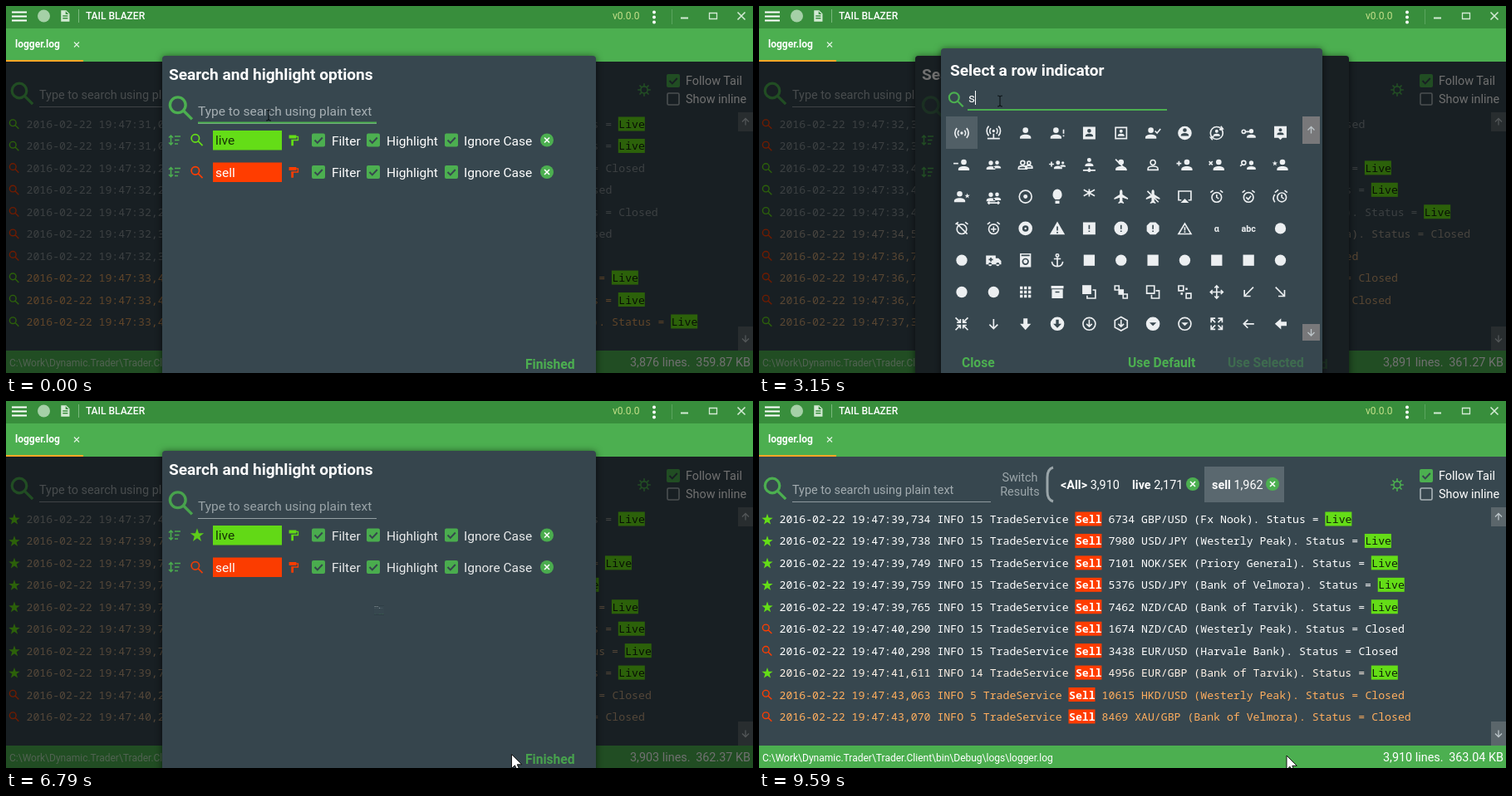
Animation of 899 by 442 pixels, one loop 9.66 s. Source, as an HTML page:

```html
<!DOCTYPE html>
<html lang="en">
<head>
<meta charset="utf-8">
<title>Log viewer</title>
<style>
html,body{margin:0;width:100%;height:100%;overflow:hidden;background:#37474f}
svg{display:block;width:899px;height:442px;font-family:Roboto,sans-serif}
text{white-space:pre}
.mono{font:13.2px "Noto Sans Mono","DejaVu Sans Mono",monospace}
.panel{filter:drop-shadow(0 1px 4px rgba(0,0,0,.6))}
</style>
</head>
<body>
<svg id="stage" viewBox="0 0 899 442"></svg>
<script>
const LOOP = 9660, GREEN = '#4caf50', LIVE = '#64dd17', SELL = '#ff3d00', SLATE = '#37474f', PALE = '#eceff1';
const $ = id => document.getElementById(id);
const clamp = v => Math.max(0, Math.min(1, v));
const ramp = (t, a, b) => clamp((t - a) / (b - a));
const ease = p => p * p * (3 - 2 * p);

// --- drawing helpers, icons live in a 24 unit box ---
const dot = (x, y, r) => `M${x - r} ${y}a${r} ${r} 0 1 0 ${2 * r} 0a${r} ${r} 0 1 0 ${-2 * r} 0z`;
const man = (x = 12, y = 4, s = 1) => {
  const a = 4 * s, b = 8 * s;
  return `M${x} ${y}a${a} ${a} 0 1 1 0 ${b} ${a} ${a} 0 0 1 0 ${-b}m0 ${10 * s}c${4.4 * s} 0 ${b} ${1.8 * s} ${b} ${a}v${2 * s}h${-2 * b}v${-2 * s}c0 ${-2.2 * s} ${3.6 * s} ${-a} ${b} ${-a}z`;
};
const star = (x, y, r) => 'M' + [...Array(10).keys()].map(i => {
  const q = i % 2 ? r * .4 : r, w = i * Math.PI / 5;
  return (x + q * Math.sin(w)).toFixed(2) + ' ' + (y - q * Math.cos(w)).toFixed(2);
}).join('L') + 'z';
const box = (x, y, w, h = w) => `M${x} ${y}h${w}v${h}h${-w}z`;

// parts split by "|": "." strokes, "T" writes, the rest fills
const icon = (spec, x, y, s = .83, color = PALE) =>
  `<g transform="translate(${x - 12 * s} ${y - 12 * s}) scale(${s})">` + spec.split('|').map(p =>
    p[0] === '.' ? `<path d="${p.slice(1)}" fill="none" stroke="${color}" stroke-width="2"/>` :
    p[0] === 'T' ? `<text x="12" y="17" text-anchor="middle" font-size="13" font-weight="700" fill="${color}">${p.slice(1)}</text>` :
    `<path d="${p}" fill="${color}" fill-rule="evenodd"/>`).join('') + '</g>';
const txt = (x, y, s, size, fill = '#fff', more = '') => `<text x="${x}" y="${y}" font-size="${size}" fill="${fill}" ${more}>${s}</text>`;
const rect = (x, y, w, h, fill, more = '') => `<rect x="${x}" y="${y}" width="${w}" height="${h}" fill="${fill}" ${more}/>`;
const line = (d, color, w = 1, more = '') => `<path d="${d}" fill="none" stroke="${color}" stroke-width="${w}" ${more}/>`;
const BOLD = 'font-weight="600"';

const MAG = '.' + dot(9.5, 9.5, 5.5) + 'M13.6 13.6l6 6';
const STAR = star(12, 12.5, 10);
const check = (x, y) => rect(x, y, 16, 16, GREEN, 'rx="2"') + line(`M${x + 3.5} ${y + 8}l3.3 3.4 6-6.4`, SLATE, 2);
const cross = (x, y) => `<circle cx="${x}" cy="${y}" r="8" fill="${GREEN}"/>` + line(`M${x - 3} ${y - 3}l6 6m0-6l-6 6`, '#fff', 1.6);
const arrowBox = (x, y, w, h, up, fill) => {
  const cx = x + w / 2, cy = y + h / 2, k = up ? -1 : 1;
  return rect(x, y, w, h, fill) + line(`M${cx} ${cy - 4 * k}v${8 * k}m-4 ${-4 * k}l4 ${4 * k} 4 ${-4 * k}`, '#bcc5c9', 1.3);
};

// --- icon picker ---
const waves = y => `.M8 ${y - 4}a6 6 0 0 0 0 8M16 ${y - 4}a6 6 0 0 1 0 8M5 ${y - 7}a10 10 0 0 0 0 14M19 ${y - 7}a10 10 0 0 1 0 14|` + dot(12, y, 2);
const pair = man(8, 6, .8) + man(17, 6, .7);
const slash = '|.M4 4l16 16';
const bell = '.' + dot(12, 13, 7) + 'M3 6l4-3M21 6l-4-3';
const ring = '.' + dot(12, 12, 9);
const disc = dot(12, 12, 10);
const mark = 'M11 7h2v6h-2zM11 15h2v2h-2z';
const plane = 'M12 2q2 0 2 4v3l8 5v2l-8-2.500v5l2 2v1.500l-4-1-4 1v-1.500l2-2v-5l-8 2.500v-2l8-5v-3q0-4 2-4z';
const ROUND = dot(12, 12, 8), SQUARE = box(4, 4, 16);
const down = 'M12 5v14M6 13l6 6 6-6', drop = 'M7 10h10l-5 5z';
const person = [man(9) , man(15)];
const withStar = [star(4, 10, 4) + man(15), man(9) + star(20, 11, 4)];
const ICONS = [
  waves(12), waves(9) + '|.M12 13v7M3 20h18', man(), man(10) + 'M20 7h2v6h-2zM20 15h2v2h-2z', box(3, 3, 18) + man(12, 6, .7),
  '.' + box(4, 4, 16) + '|' + man(12, 7, .6), person[0] + '|.M15 9l3 3 5-6', disc + man(12, 5, .7), ring + 'M18 2l3 4-5 1M6 22l-3-4 5-1|' + man(12, 7, .6),
  man(16, 6, .8) + '|.' + dot(5, 10, 2.5) + 'M7 10h6', 'M3 2h18v17h-6l-3 3-3-3h-6z' + man(12, 5, .6),
  person[1] + '|.M0 10h7', pair, '.' + man(8, 6, .75) + man(17, 7, .6), man(13, 6, .75) + man(20, 7, .5) + '|.M0 11h7M3.500 7.500v7', man(12, 2, .75) + '|.M12 16v4M3 20h18|' + dot(12, 20, 2.5),
  man() + slash, '.' + man(12, 5, .9), person[1] + '|.M0 10h7M3.500 6.500v7', person[1] + '|.M1 7l5 5m0-5l-5 5', man(16, 6, .8) + '|.' + dot(5, 9, 3) + 'M3 11l-3 3', withStar[0],
  withStar[1], pair + '|.M4 21h16M6 19l-2 2 2 2M18 19l2 2-2 2', ring + '|' + dot(12, 12, 3), 'M12 1a7 8 0 0 1 3 15h-6a7 8 0 0 1 3-15zM9 18h6v4h-6z', '.M4 2l16 9M20 2L4 11M12 1v11|M10 4h4v4h-4z|T&#8201;',
  plane, plane + slash, '.M7 17h-4V4h18v13h-4|M6 21h12l-6-6z', bell + 'M12 9v4l3 2', bell + 'M8.500 13l3 3 4-5', '.' + dot(14, 13, 6.5) + 'M14 9v4l3 2M4 6l5-4M4 20a9 9 0 0 1 0-11M22 6l-4-3',
  bell + slash, bell + 'M12 9v8M8 13h8', disc + dot(12, 12, 4.5) + dot(12, 12, 1.5), 'M1 21h22L12 2zM11 9h2v6h-2zM11 17h2v2h-2z', box(3, 3, 18) + mark, disc + mark,
  'M8 3h8l5 5v8l-5 5H8l-5-5V8z' + mark, '.M3 20h18L12 5z|M11 10h2v5h-2zM11 16h2v2h-2z', 'Tα', 'Tabc', ROUND,
  ROUND, 'M1 5h14v4h4l4 4v5H1z' + dot(7, 18, 2.5) + dot(18, 18, 2.5) + 'M7 8h2v2h2v2h-2v2h-2v-2h-2v-2h2z', box(4, 2, 16, 20) + box(6, 4, 12, 2) + dot(12, 14, 5) + dot(12, 14, 3), '.' + dot(12, 5, 2) + 'M12 7v14M7 10h10M4 14q1 7 8 7t8-7', SQUARE, ROUND,
  SQUARE, ROUND, SQUARE, SQUARE, ROUND,
  ROUND, ROUND, [4, 10, 16].map(y => [4, 10, 16].map(x => box(x, y, 4)).join('')).join(''), box(3, 3, 18, 4) + 'M4 8h16v13H4zM9 11h6v2H9z', box(2, 2, 13) + '|.M17 9h4v12H9v-4',
  '.' + box(3, 3, 6) + box(15, 15, 6) + '|' + box(8, 8, 8), '.' + box(3, 3, 11) + '|M16 9h6v13H9v-6h2v4h9v-9h-4z', '.' + box(3, 3, 7) + box(14, 14, 7) + '|' + box(13, 6, 3) + box(6, 13, 3), '.M12 3v18M3 12h18M9 6l3-3 3 3M9 18l3 3 3-3M6 9l-3 3 3 3M18 9l3 3-3 3', '.M19 5L6 18M6 9v9h9', '.M5 5l13 13M18 9v9H9',
  '.M3 3l7 7M21 3l-7 7M3 21l7-7M21 21l-7-7M5 10h5V5M19 10h-5V5M5 14h5v5M19 14h-5v5', '.' + down, 'M9 4h6v8h5l-8 9-8-9h5z', disc + 'M10 6h4v6h4l-6 6-6-6h4z', ring + 'M12 6v10M8 12l4 4 4-4', '.M12 2l9 5v10l-9 5-9-5V7zM12 6v10M8 12l4 4 4-4',
  disc + drop, ring + '|' + drop, '.M4 10V4h6M20 10V4h-6M4 14v6h6M20 14v6h-6M4 4l6 6M20 4l-6 6M4 20l6-6M20 20l-6-6', '.M20 12H5M11 6l-6 6 6 6', 'M21 9v6h-8v5l-9-8 9-8v5z'
];
const FOUND = [
  ...withStar, '.' + dot(12, 7, 6) + 'M12 3.500v4h3M4 15v8M4 19h15M16 16l3 3-3 3', '.M4 12h18|' + dot(4, 12, 3), '.M4 12h16M17 8.500l4 3.500-4 3.500|' + dot(4, 12, 3), '.M4 12h16|' + dot(4, 12, 3) + dot(20, 12, 3),
  STAR, disc + star(12, 12, 7), '.' + star(12, 12.5, 8.5) + '|M12 2.500V16l-6 4.500 2.500-7L2 9.500h7.500z', STAR + slash, '.' + star(12, 12.5, 8.5)
];
const cell = (list, dx = 38.35) => list.map((s, i) => icon(s, 244 + dx * (i % 11), 153 + 38.3 * Math.floor(i / 11))).join('');

// --- log data: stamp, thread, deal, pair, bank, state ---
const BANKS = { 7: 'Fx Nook', 12: 'Harvale Bank', 13: 'Westerly Peak', 14: 'Bank of Tarvik', P: 'Priory General', 15: 'Bank of Velmora', 22: 'Savings Bank of Melora' };
const LOG = `31,024 15 6210 USD/JPY 14 L
31,031 15 4417 EUR/GBP 14 L
32,214 15 2281 GBP/USD 12 C
32,221 15 9034 NZD/CAD 7 C
32,236 15 3178 EUR/USD P C
32,310 15 5502 NOK/SEK 7 C
32,318 5 87 USD/JPY 7 C
33,402 15 7316 GBP/USD 13 L
33,415 15 6648 EUR/USD 14 L
33,431 15 1925 HKD/USD 22 L
34,518 15 10342 NZD/CAD 22 C
36,702 5 4871 EUR/GBP 7 C
36,711 15 8120 USD/JPY 12 C
36,724 5 2659 XAU/GBP 12 C
37,318 5 3307 GBP/USD 7 L
37,326 15 7745 NOK/SEK P L
37,341 15 10518 EUR/USD 22 L
37,402 15 6093 USD/JPY 14 L
39,712 5 5180 EUR/GBP 7 L
39,725 15 4026 NZD/CAD 12 L
39,734 15 6734 GBP/USD 7 L
39,738 15 7980 USD/JPY 13 L
39,749 15 7101 NOK/SEK P L
39,759 15 5376 USD/JPY 15 L
39,765 15 7462 NZD/CAD 14 L
40,290 15 1674 NZD/CAD 13 C
40,298 15 3438 EUR/USD 12 C
41,611 14 4956 EUR/GBP 14 L
43,063 5 10615 HKD/USD 13 C
43,070 5 8469 XAU/GBP 15 C`.split('\n').map(r => {
  const [stamp, th, id, pairName, bank, st] = r.split(' ');
  const head = `2016-02-22 19:47:${stamp} INFO ${th} TradeService `;
  const mid = ` ${id} ${pairName} (${BANKS[bank]}). Status = `;
  return { head, mid, live: st === 'L' };
});
// first row, last row, arrival, glow length
const BATCHES = [[7, 9, -700, 2300], [10, 10, 1050, 2800], [11, 14, 2400, 1700], [15, 17, 3600, 3600], [18, 26, 6300, 900], [27, 27, 7100, 2800], [28, 29, 8820, 2600]];
const COUNTS = [[0, '3,876', '359.87'], [1050, '3,878', '360.08'], [2400, '3,884', '360.63'], [2950, '3,891', '361.27'], [6300, '3,903', '362.37'], [7100, '3,905', '362.56'], [8820, '3,910', '363.04']];
const latest = (list, t) => list.filter(e => e[0] <= t).pop();

const CW = 7.92, X0 = 24.5;
function rowMarkup(r, i, glow, dim, starred) {
  const y = 142.5 + 26.44 * i, b = y + 4.5, a = r.head.length, e = a + 4 + r.mid.length;
  const at = n => X0 + n * CW;
  const color = `rgb(255,${Math.round(255 - 115 * glow)},${Math.round(255 - 229 * glow)})`;
  const faint = `opacity="${(1 - dim * .6 * (1 - glow)).toFixed(3)}"`;
  const t = (n, s, fill, more) => `<text class="mono" x="${at(n)}" y="${b}" fill="${fill}" ${more}>${s}</text>`;
  return icon(r.live && starred ? STAR : MAG, 10, y, .7, r.live ? LIVE : SELL) +
    t(0, r.head, color, faint) + rect(at(a) - .5, y - 9, 32, 17, SELL) + t(a, 'Sell', '#fff', 'style="font-weight:700"') +
    t(a + 4, r.mid, color, faint) +
    (r.live ? rect(at(e) - .5, y - 9, 32, 17, LIVE) + t(e, 'Live', '#102008', '') : t(e, 'Closed', color, faint));
}

// --- static parts ---
const DARK = 'rgba(0,0,0,.56)', TOP = '#d3ead4';
const header = rect(0, 0, 899, 27, '#388e3c') + rect(0, 27, 899, 40, GREEN) + rect(0, 65, 93, 2, '#ffa726') +
  line('M7 7.500h18M7 12.500h18M7 17.500h18', '#fff', 2) + `<circle cx="45.500" cy="12" r="7.500" fill="#a5d0a7"/>` +
  icon('M5 2h9l6 6v14H5zM8 11v2h9v-2zM8 15v2h9v-2zM13 3.500v5.500h5.500z', 71, 12, .68, TOP) + line('M87.500 4v16', '#7ab97d') +
  txt(96, 16, 'TAIL BLAZER', 12, '#fff', 'font-weight="500"') + txt(730, 16, 'v0.0.0', 12, '#c5e08a') +
  [7.5, 13.5, 19.5].map(y => `<circle cx="780" cy="${y}" r="2" fill="#fff"/>`).join('') + line('M801.500 4v18', '#5aa55e') +
  line('M812 14.500h9', TOP, 2) + line('M846.500 8.500h9v7h-9z', TOP, 1.3) + line('M880.500 7.500l9 9m0-9l-9 9', TOP, 1.6) +
  txt(11, 50, 'logger.log', 12, '#fff', 'font-weight="700"') + line('M82 43.500l6 6m0-6l-6 6', '#e2f3e3', 1.2);

const gear = '.' + dot(12, 12, 5) + [...Array(8).keys()].map(i => {
  const c = Math.cos(i * Math.PI / 4), s = Math.sin(i * Math.PI / 4);
  return `M${12 + 5 * c} ${12 + 5 * s}L${12 + 9.5 * c} ${12 + 9.5 * s}`;
}).join('');
const main = rect(0, 67, 899, 375, SLATE) + icon(MAG, 20, 106, 1.6, GREEN) + txt(40, 112, 'Type to search using plain text', 14.4, '#a3acb0') +
  line('M40 121.500h239', '#8f9a9f') + txt(314, 97, 'Switch', 14.4, '#9ca6aa', 'text-anchor="middle"') + txt(314, 114, 'Results', 14.4, '#9ca6aa', 'text-anchor="middle"') +
  line('M354 80q-7 2-7 12v17q0 10 7 12', '#9aa5a9', 3) + rect(536, 79, 96, 43, '#5a686f') +
  '<g id="tabs"></g>' + cross(522, 100) + cross(618, 100) + icon(gear, 768, 101, .82, GREEN) +
  check(795, 82) + txt(818, 95, 'Follow Tail', 14.4) + rect(796, 105, 14, 14, 'none', 'rx="1.500" stroke="#aab4b8" stroke-width="1.600"') + txt(818, 117, 'Show inline', 14.4) +
  arrowBox(881, 128, 18, 23, true, '#5b666b') + arrowBox(881, 386, 18, 29, false, '#5b666b') + '<g id="rows"></g>' +
  rect(0, 415, 899, 27, GREEN) + '<g id="path">' + txt(4, 434, 'C:\\Work\\Dynamic.Trader\\Trader.Client\\bin\\Debug\\logs\\logger.log', 12) + '</g><g id="status"></g>' +
  rect(0, 67, 899, 375, DARK, 'id="shade"');

const sorter = y => line(`M198.500 ${y - 5}v10M196 ${y - 3}l2.500-2.500 2.500 2.500M196 ${y + 3}l2.500 2.500 2.500-2.500M203 ${y - 4.5}h7M203 ${y}h5.500M203 ${y + 4.5}h4`, GREEN, 1.5);
const roller = 'M4 3h13v2h4v8h-9v9h-4V11h11V7h-2v2H4z';
const option = (y, name, color, ink) => sorter(y) + rect(249, y - 11.5, 83, 23.5, color) + txt(252, y + 5.5, name, 15.5, ink) + icon(roller, 346, y, .68, color) +
  [368, 434, 528].map(x => check(x, y - 8)).join('') + cross(651, y);
const labels = y => txt(392, y + 6, 'Filter', 15.5) + txt(458, y + 6, 'Highlight', 15.5) + txt(551, y + 6, 'Ignore Case', 15.5);
const options = '<g id="optDialog">' + rect(188, 60, 522, 390, SLATE, 'rx="4" class="panel"') + txt(196, 89, 'Search and highlight options', 19.1, '#fff', BOLD) +
  rect(215, 148, 27, 27, '#56646b', 'id="hover"') + line('M231 141.500h215', '#98a3a7') + line('', GREEN, 2, 'id="focus1"') +
  option(161.5, 'live', LIVE, '#173305') + option(200, 'sell', SELL, '#fff') +
  '<g id="fading">' + icon(MAG, 211, 123.5, 1.7, GREEN) + txt(231, 132, 'Type to search using plain text', 15.5, '#a7b0b4') + '<g id="liveMark"></g>' + icon(MAG, 230, 200.5, .86, SELL) +
  labels(161.5) + labels(200) + txt(625, 437, 'Finished', 15.6, GREEN, BOLD) + '</g>' + rect(188, 60, 522, 390, DARK, 'rx="4" id="shade1"') + '</g>';

const picker = '<g id="pickDialog">' + rect(219, 51, 459, 400, SLATE, 'rx="4" class="panel"') + txt(230, 84, 'Select a row indicator', 19.1, '#fff', BOLD) +
  '<g id="find"></g>' + txt(252, 116, '', 15.5, '#fff', 'id="query"') + line('', '#fff', 1, 'id="caret"') + line('M251 125.500h240', '#98a3a7') + line('M251 125h240', GREEN, 2, 'id="focus2"') +
  '<g id="all">' + rect(225, 133, 38, 39, '#515f66') + cell(ICONS) + arrowBox(654, 133, 21, 33, true, '#78787a') + arrowBox(654, 383, 21, 20, false, '#78787a') + '</g>' +
  '<g id="found">' + rect(455, 133, 38, 39, '#87949a', 'id="picked"') + rect(493, 133, 39, 39, '#515f66', 'id="passed"') + cell(FOUND) + '</g>' +
  txt(244, 435, 'Close', 15.6, GREEN, BOLD) + txt(444, 435, 'Use Default', 15.6, GREEN, BOLD) + txt(564, 435, 'Use Selected', 15.6, GREEN, BOLD + ' id="use"') + '</g>';

const outline = d => `<path d="${d}" fill="#fff" stroke="#111" stroke-width="1" stroke-linejoin="round"/>`;
const POINTERS = {
  beam: line('M-3 -6q3 0 3 2v9q0 2-3 2M3 -6q-3 0-3 2v9q0 2 3 2', '#10181c', 1.2),
  arrow: outline('M0 0v17l4-3.700 2.700 6.200 2.800-1.200-2.700-6h5.500z'),
  hand: outline('M0 1q1.500-2 3 0v8q1.500-1.500 3 .5 1.500-1.200 3 .6 2-.8 2.500 1.500v6q0 2-2 5h-7q-2-4-6-8.500-.500-2 1.500-2l2 2z')
};
$('stage').innerHTML = main + header + options + picker + '<g id="pointer"></g>';

// --- motion ---
const PATH = [[0, 316, 131], [210, 316, 131], [1000, 237, 167], [1750, 238, 167], [2100, 284, 142], [2200, 284, 142], [2800, 290, 114], [4450, 290, 114], [5150, 474, 155], [5450, 474, 155],
  [6020, 584, 212], [6400, 608, 427], [6700, 608, 427], [7350, 616, 399], [7750, 652, 427], [8300, 652, 427], [9000, 640, 424], [9590, 635, 427], [LOOP, 635, 427]];
const SHAPES = [[0, 'beam'], [350, 'arrow'], [750, 'hand'], [1760, 'arrow'], [2500, 'beam'], [4600, 'arrow'], [6250, 'hand'], [6600, 'arrow'], [7550, 'hand'], [8250, 'arrow']];
const KEYS = [3150, 3360, 3570, 3710];

const last = {};
function fill(id, html) {
  if (last[id] !== html) $(id).innerHTML = last[id] = html;
}
const set = (id, name, v) => $(id).setAttribute(name, v);
const show = (id, on) => set(id, 'display', on ? 'inline' : 'none');
function zoom(id, k, cx, cy) {
  show(id, k > .001);
  set(id, 'transform', k < 1 ? `translate(${cx} ${cy}) scale(${k}) translate(${-cx} ${-cy})` : '');
}

function draw(t) {
  const dim = 1 - ease(ramp(t, 8190, 8490));
  const pick = ease(ramp(t, 1700, 2000)) - ease(ramp(t, 6520, 6820));
  const off = ramp(t, 1400, 1600) - ramp(t, 6620, 6820);
  const starred = t >= 6540;

  const end = BATCHES.filter(b => b[2] <= t).pop()[1];
  let rows = '';
  for (let i = 0; i < 10; i++) {
    const n = end - 9 + i, b = BATCHES.find(b => n >= b[0] && n <= b[1]);
    rows += rowMarkup(LOG[n], i, b ? 1 - ramp(t, b[2], b[2] + b[3]) : 0, dim, starred);
  }
  fill('rows', rows);
  const [, lines, kb] = latest(COUNTS, t);
  fill('status', txt(751, 434, `${lines} lines.`, 14.4) + txt(896, 434, `${kb} KB`, 14.4, '#fff', 'text-anchor="end"'));
  const tab = (x, name, n) => txt(x, 106, `<tspan font-weight="700">${name}</tspan> ${n}`, 14.4);
  fill('tabs', tab(363, '&lt;All&gt;', lines) + tab(449, 'live', '2,171') + tab(545, 'sell', t < 8820 ? '1,960' : '1,962'));
  set('path', 'opacity', 1 - dim * .4);
  set('shade', 'opacity', dim);

  zoom('optDialog', dim, 449, 255);
  set('fading', 'opacity', 1 - .62 * off);
  set('shade1', 'opacity', pick);
  fill('liveMark', starred ? icon(STAR, 230, 161.5, .86, LIVE) : icon(MAG, 230, 161.5, .86, LIVE));
  set('hover', 'opacity', ramp(t, 800, 950) - ramp(t, 1760, 1900));
  const half = 107.5 * (1 - ramp(t, 1450, 1725));
  set('focus1', 'd', half ? `M${338.5 - half} 140.500h${2 * half}` : '');

  zoom('pickDialog', pick, 449, 252);
  const typed = 'star'.slice(0, KEYS.filter(k => k <= t).length);
  const query = $('query'), focused = t < 5300;
  query.textContent = typed || 'Enter text to find icon';
  query.setAttribute('fill', typed ? '#fff' : '#a0aaae');
  fill('find', icon(MAG, 237.5, 113, 1.08, typed && focused ? GREEN : '#c9d0d3'));
  const since = t - (latest([[2000], ...KEYS.map(k => [k])], t) || [0])[0];
  const cx = 252.5 + (typed ? query.getComputedTextLength() : 0);
  set('caret', 'd', focused && Math.floor(since / 530) % 2 === 0 ? `M${cx} 102v17` : '');
  const rule = 1 - ramp(t, 5300, 5550);
  set('focus2', 'd', rule ? `M${371 - 120 * rule} 125h${240 * rule}` : '');
  show('all', t < 3920);
  show('found', t >= 3920);
  set('picked', 'opacity', ramp(t, 5100, 5300));
  set('passed', 'opacity', ramp(t, 5500, 5600) * (1 - .9 * ramp(t, 6000, 6400)));
  set('use', 'opacity', t < 5300 ? .35 : 1);

  const i = Math.max(1, PATH.findIndex(p => p[0] > t)), a = PATH[i - 1], b = PATH[i];
  const p = ease(ramp(t, a[0], b[0]));
  fill('pointer', POINTERS[latest(SHAPES, t)[1]]);
  set('pointer', 'transform', `translate(${a[1] + (b[1] - a[1]) * p} ${a[2] + (b[2] - a[2]) * p})`);
}

function frame() {
  draw(performance.now() % LOOP);
  requestAnimationFrame(frame);
}
frame();
</script>
</body>
</html>
```
